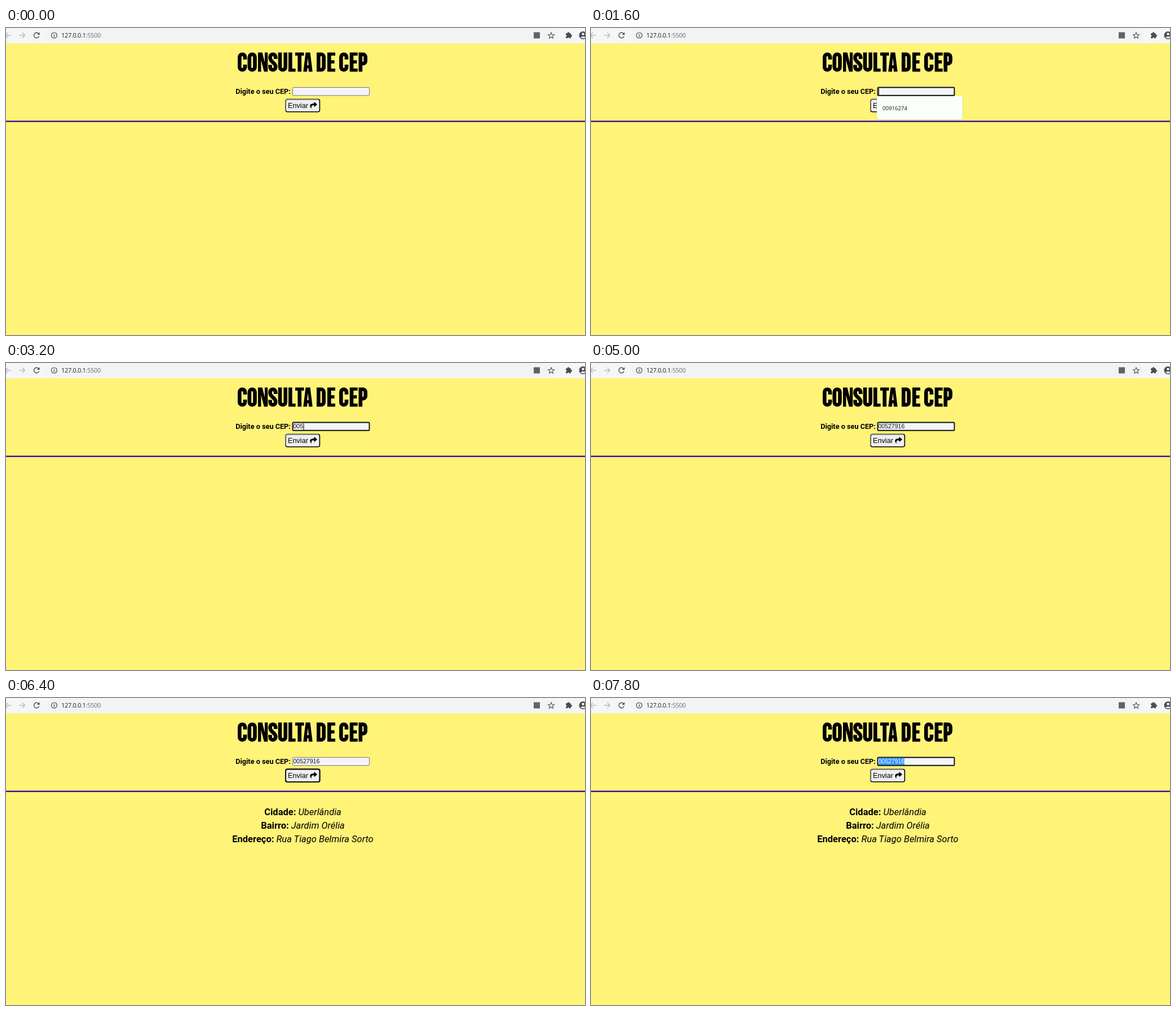
An HTML page that plays this animation: 1027 by 545 pixels, repeating every 8000 ms.

```html
<!DOCTYPE html>
<html lang="pt-BR">
<head>
<meta charset="utf-8">
<title>Consulta de CEP</title>
<style>
html, body { margin: 0; width: 100%; height: 100%; overflow: hidden; background: #fff378; }
svg { position: absolute; left: 0; top: 0; display: block; }
h1 { position: absolute; left: 411px; top: 40px; margin: 0; font: 700 28px/40px Roboto, sans-serif; color: transparent; white-space: nowrap; }

.url { font: 11px "Open Sans", sans-serif; letter-spacing: -.33px; }
.label { font: 700 12.7px Roboto, sans-serif; text-anchor: middle; }
.send { font: 12.7px "Liberation Sans", Arial, sans-serif; }
.hint { font: 9.6px "Open Sans", sans-serif; fill: #111; }
.rows { font: italic 400 16.5px Roboto, sans-serif; text-anchor: middle; }
.rows .key { font-style: normal; font-weight: 700; }
.line { fill: none; stroke: #000; stroke-width: 6.6; }
.icon { fill: none; stroke: #4a4d51; stroke-width: 1.4; }

.field, .drop, .ring, .pressed, .rows, .typed, .typed span, .caret {
  animation: 8s step-end infinite;
}
.field { fill: #f3f5fb; animation-name: field; }
.drop { animation-name: drop; }
.ring { animation-name: ring; }
.pressed { animation-name: pressed; }
.rows { animation-name: rows; }

.typed {
  position: absolute; left: 509.5px; top: 106px; height: 13px;
  font: 10.5px/13px "Liberation Sans", Arial, sans-serif; white-space: nowrap;
  overflow: hidden; animation-name: type;
}
.typed span { display: inline-block; height: 13px; animation-name: select; }
.caret {
  position: absolute; left: 509.5px; top: 107px; width: 1px; height: 12px;
  font: 10.5px/12px "Liberation Sans", Arial, sans-serif;
  background: #000; animation-name: move, blink;
}

@keyframes field {
  0%, 75%, 100% { stroke: #767676; stroke-width: 1; }
  17.5%, 93.75% { stroke: #333; stroke-width: 1; }
  18.75%, 96.25% { stroke: #101010; stroke-width: 1.9; }
}
@keyframes drop {
  0%, 40%, 100% { visibility: hidden; }
  20% { visibility: visible; }
}
@keyframes ring {
  0%, 96.25%, 100% { visibility: hidden; }
  75% { visibility: visible; }
}
@keyframes pressed {
  0%, 80%, 100% { visibility: hidden; }
  75% { visibility: visible; }
}
@keyframes rows {
  0%, 100% { visibility: hidden; }
  80% { visibility: visible; }
}
@keyframes type {
  0% { width: 0; }
  33.75% { width: 1ch; }
  36.25% { width: 2ch; }
  40% { width: 3ch; }
  42.5% { width: 4ch; }
  47.5% { width: 5ch; }
  51.25% { width: 6ch; }
  55% { width: 7ch; }
  56.25%, 100% { width: 8ch; }
}
@keyframes move {
  0% { transform: none; }
  33.75% { transform: translateX(1ch); }
  36.25% { transform: translateX(2ch); }
  40% { transform: translateX(3ch); }
  42.5% { transform: translateX(4ch); }
  47.5% { transform: translateX(5ch); }
  51.25% { transform: translateX(6ch); }
  55% { transform: translateX(7ch); }
  56.25%, 100% { transform: translateX(8ch); }
}
@keyframes blink {
  0%, 25%, 62.5%, 75%, 100% { visibility: hidden; }
  18.75%, 31.25%, 68.75% { visibility: visible; }
}
@keyframes select {
  0% { color: #111; background: transparent; }
  97.5%, 100% { color: #fff; background: #3390ff; }
}
</style>
</head>
<body>
<h1>CONSULTA DE CEP</h1>
<svg width="1027" height="545" viewBox="0 0 1027 545">
  <defs>
    <path id="c" class="line" d="M13 56V51.6a4.85 4.85 0 0 0-9.7 0V69.4a4.85 4.85 0 0 0 9.7 0V65"/>
    <path id="e" d="M0 43.5h14v5.6h-7.4v8.2h6v5.6h-6v9h7.4v5.6h-14z"/>
  </defs>

  <!-- browser bar -->
  <rect width="1027" height="27" fill="#f5f6f8"/>
  <rect x="72" y="1" width="908" height="23" rx="11.5" fill="#f1f3f4"/>
  <g class="icon">
    <path d="M9 13H-1M3.5 8.3L-1.2 13l4.7 4.7M23.5 13h10M28.8 8.3l4.7 4.7-4.7 4.7" stroke="#b8babd" style="stroke:#b8babd"/>
    <path d="M57.6 9.8a4.7 4.7 0 1 0 1 4.6"/>
    <path d="M59.6 7.4v4.7h-4.7z" fill="#4a4d51" stroke="none" style="stroke:none"/>
    <circle cx="85.5" cy="13" r="5" stroke-width="1.2"/>
    <path d="M85.5 12.2v3.6M85.5 10v1.3"/>
    <path d="M967 8l1.5 3.6 3.9.3-3 2.5 1 3.8-3.4-2-3.4 2 1-3.8-3-2.5 3.9-.3z" style="stroke-width:1.1"/>
  </g>
  <rect x="936" y="7.5" width="11" height="11" fill="#5f6368"/>
  <g fill="#4a4d51">
    <rect x="993" y="9.3" width="9" height="9" rx="1"/>
    <circle cx="997.5" cy="9" r="1.8"/>
    <circle cx="1002.3" cy="13.8" r="1.8"/>
    <circle cx="1023.5" cy="13" r="7"/>
  </g>
  <g fill="#f5f6f8">
    <circle cx="993" cy="13.8" r="1.5"/>
    <circle cx="997.5" cy="18.3" r="1.5"/>
    <circle cx="1023.5" cy="10.7" r="2.2"/>
    <path d="M1019 16.4q4.5-3 9 0-4.500 4.200-9 0z"/>
  </g>
  <text class="url" x="98" y="17" fill="#202124">127.0.0.1<tspan fill="#6a6e73">:5500</tspan></text>

  <!-- heading lettering -->
  <g aria-hidden="true">
    <use href="#c" x="411"/>
    <rect class="line" x="431.8" y="46.75" width="9.7" height="27.5" rx="4.85"/>
    <path d="M447 43.5h7.6l4.4 17.5V43.5h5.2v34h-6.4l-5.400-20.500v20.500h-5.400z"/>
    <path class="line" d="M478.200 55V51.600a4.850 4.850 0 0 0-9.700 0V53c0 7.500 9.700 8.500 9.700 15.500v.9a4.850 4.850 0 0 1-9.700 0V65.500"/>
    <path class="line" d="M486 43.500V69.400a4.850 4.850 0 0 0 9.700 0V43.500"/>
    <path d="M501 43.500h6.600v28.400h6v5.600h-12.600z"/>
    <path d="M513 43.500h15.500v5.600h-4.400v28.400h-6.700v-28.400h-4.400z"/>
    <path fill-rule="evenodd" d="M531.500 43.500h8l4.200 34h-6.600l-.7-6.200h-1.800l-.7 6.200h-6.600zM534.100 65.900h2.800l-1.400-13z"/>
    <path class="line" d="M554.300 46.800h4.700a4.700 4.700 0 0 1 4.700 4.700v18a4.700 4.700 0 0 1-4.700 4.700h-4.700z"/>
    <use href="#e" x="570"/>
    <use href="#c" x="591"/>
    <use href="#e" x="609.700"/>
    <path class="line" d="M628.800 77.500V46.800h4.200a4.700 4.700 0 0 1 4.700 4.700v7a4.700 4.700 0 0 1-4.700 4.700h-4.200"/>
  </g>

  <!-- form -->
  <text class="label" x="456" y="116.500">Digite o seu CEP:</text>
  <rect class="field" x="508.500" y="105.500" width="136" height="14.300" rx="1.600"/>
  <rect x="496.200" y="126.500" width="60.200" height="22.200" rx="3" fill="#efefef" stroke="#000" stroke-width="1.600"/>
  <path d="M496.200 147v-17.500q0-3 3-3h55" fill="none" stroke="#686868" stroke-width="1.600"/>
  <g class="pressed" fill="none" stroke-width="1.600">
    <path d="M497.500 147v-17q0-2.200 2.200-2.200h55" stroke="#222"/>
    <path d="M498 147.500h55q2.200 0 2.200-2.200v-16" stroke="#777"/>
  </g>
  <rect class="ring" x="496" y="126.300" width="60.600" height="22.600" rx="3" fill="none" stroke="#101010" stroke-width="2"/>
  <text class="send" x="500" y="141.500">Enviar</text>
  <path d="M552 135.700l-4.600 4q-.9.600-.9-.4v-2.100c-4.200.1-5.500 1.200-4.400 4.700q.1.700-.7.400c-1.300-1-2.100-2.300-2.100-3.800 0-3.700 3.200-4.500 7.200-4.600v-2q0-1 .9-.4z"/>
  <rect y="164.500" width="1027" height="2.500" fill="#3f129f"/>

  <!-- suggestion list -->
  <g class="drop">
    <rect x="506.500" y="121.500" width="153" height="42" rx="3.500" fill="#000" opacity=".16"/>
    <rect x="507" y="121" width="152" height="41.500" rx="3" fill="#f9fff9"/>
    <text class="hint" x="517" y="145.500">00916274</text>
  </g>

  <!-- answer -->
  <g class="rows">
    <text x="526.500" y="208"><tspan class="key">Cidade:</tspan> Uberlândia</text>
    <text x="526.500" y="232"><tspan class="key">Bairro:</tspan> Jardim Orélia</text>
    <text x="526.500" y="255.500"><tspan class="key">Endereço:</tspan> Rua Tiago Belmira Sorto</text>
  </g>
</svg>
<div class="typed"><span>00527916</span></div>
<div class="caret"></div>
</body>
</html>
```
